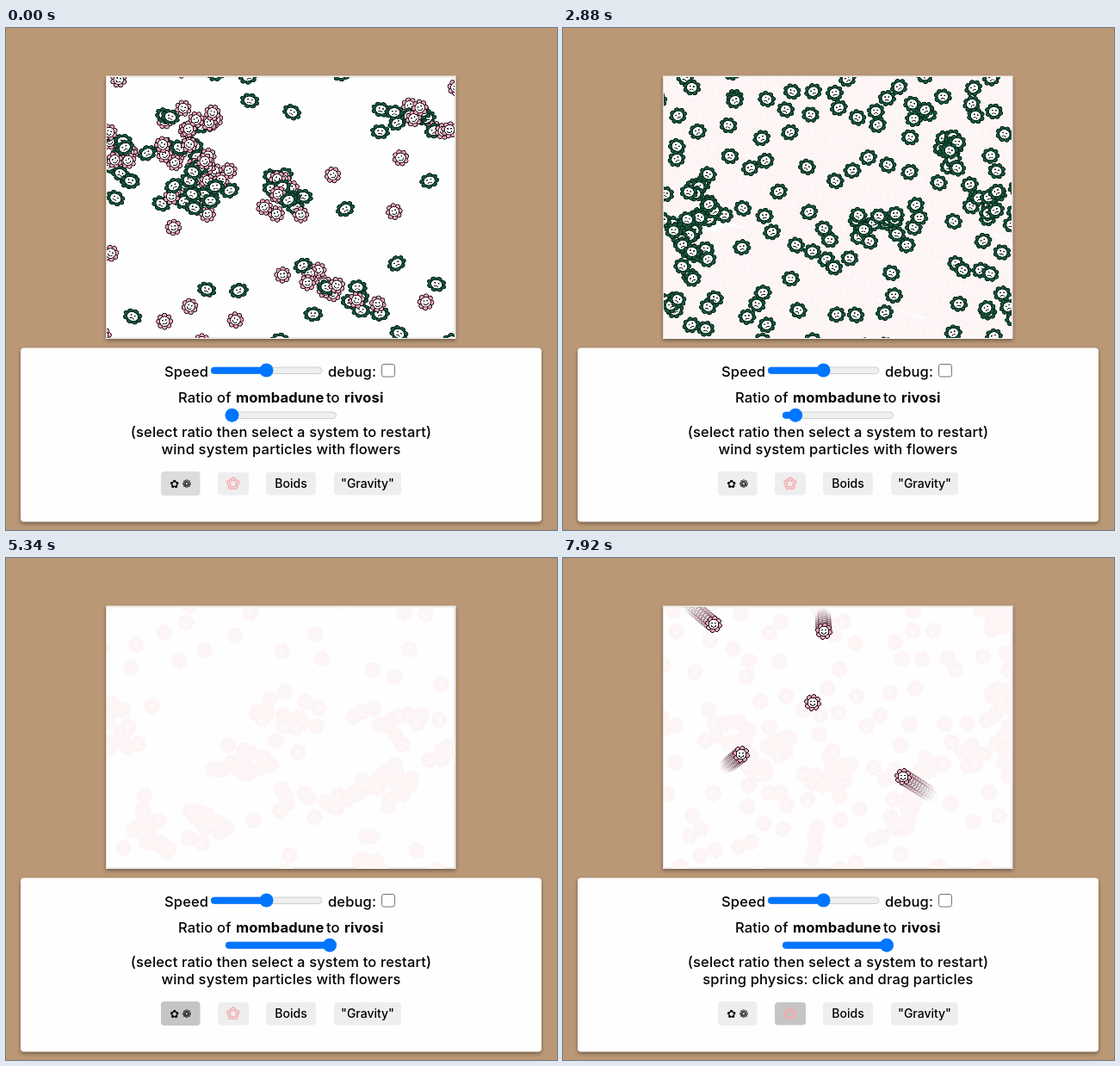
An HTML page with a canvas for the animation above (8000 ms loop, 640 px wide and 583 px high).

```html
<!DOCTYPE html>
<html lang="en">
<head>
<meta charset="utf-8">
<title>Flower particles</title>
<style>
  html, body { margin: 0; width: 100%; height: 100%; overflow: hidden; background: #ba9876; }
  svg { position: absolute; left: 0; top: 0; }
  canvas { position: absolute; left: 117px; top: 57px; width: 404px; height: 303px; }
  text { font: 500 16.5px Inter, sans-serif; letter-spacing: .15px; fill: #000; }
  .name { font-weight: 650; }
  .mid { text-anchor: middle; }
  .label { font-size: 14px; letter-spacing: 0; }
  .icon { font: 13px "DejaVu Sans", sans-serif; letter-spacing: 0; }
  .card { fill: #fefefe; filter: drop-shadow(0 2px 2px rgba(0, 0, 0, .4)); }
  .track { fill: #efefef; stroke: #c4c4c4; stroke-width: .8; }
  .blue { fill: #0075ff; }
  .button { fill: #efeeef; }
</style>
</head>
<body>
<svg width="640" height="583" viewBox="0 0 640 583">
  <rect class="card" x="116" y="55.5" width="406.5" height="305.5"/>
  <rect x="116.5" y="57" width="404.5" height="302.7" fill="none" stroke="#d9d8d4" stroke-width=".8"/>
  <rect class="card" x="17" y="371.5" width="605" height="202" rx="4"/>

  <text x="184" y="405">Speed</text>
  <rect class="track" x="238" y="394" width="129" height="7.5" rx="3.75"/>
  <rect class="blue" x="238" y="393.8" width="65" height="8" rx="4"/>
  <circle class="blue" cx="302.5" cy="397.5" r="8"/>
  <text x="374" y="405">debug:</text>
  <rect x="436.5" y="390.5" width="15" height="14.5" rx="2.5" fill="#fff" stroke="#767676"/>

  <text x="200" y="435">Ratio of</text>
  <text class="name" x="267" y="435">mombadune</text>
  <text x="372" y="435">to</text>
  <text class="name" x="393" y="435">rivosi</text>
  <rect class="track" x="255" y="446" width="128.5" height="7.5" rx="3.75"/>
  <rect class="blue" id="ratioFill" x="255" y="445.8" width="8" height="8" rx="4"/>
  <circle class="blue" id="ratioThumb" cx="262.5" cy="449.7" r="8"/>

  <text class="mid" x="319.5" y="475">(select ratio then select a system to restart)</text>
  <text class="mid" id="mode" x="319.5" y="495"></text>

  <rect class="button" id="windButton" x="180" y="515" width="45.5" height="28" rx="4"/>
  <text class="icon mid" x="195.7" y="534">✿</text>
  <text class="icon mid" x="210" y="534">❁</text>
  <rect class="button" id="springButton" x="246" y="516" width="36" height="26.5" rx="4"/>
  <path id="rosette" transform="translate(263.8 529.2)" fill="none" stroke="#f3a9ab" stroke-width="1.4"/>
  <rect class="button" x="302" y="516" width="58" height="26.5" rx="4"/>
  <text class="label mid" x="331" y="534">Boids</text>
  <rect class="button" x="381" y="516" width="78" height="26.5" rx="4"/>
  <text class="label mid" x="420" y="534">"Gravity"</text>
</svg>
<canvas></canvas>
<script>
const LOOP = 8000;
const RESTART = { wind: 1100, ratio: 3600, full: 5340, spring: 7530 };
const FIELD = { x: 107, y: 47, w: 424, h: 323 };
const $ = id => document.getElementById(id);
const mod = (v, m) => ((v % m) + m) % m;
const smooth = v => {
  v = Math.max(0, Math.min(1, v));
  return v * v * (3 - 2 * v);
};

let seed = 7;
const random = () => {
  seed = (seed * 16807) % 2147483647;
  return seed / 2147483647;
};
const bell = () => random() + random() + random() - 1.5;

const anywhere = () => ({ x: FIELD.x + random() * FIELD.w, y: FIELD.y + random() * FIELD.h });
const along = ([x1, y1, x2, y2]) => {
  const u = random();
  return { x: x1 + (x2 - x1) * u + bell() * 20, y: y1 + (y2 - y1) * u + bell() * 20 };
};
// Of a few random places, the one with the most room around it.
function roomiest(taken) {
  const room = p => Math.min(...taken.map(q => Math.hypot(p.x - q.x, p.y - q.y)));
  return Array.from({ length: 4 }, anywhere).reduce((a, b) => room(b) > room(a) ? b : a);
}

// Flowers gather along a few ridges; the loose share is strewn over the field.
function swarm(time, count, loose, kinds, ridges) {
  const flowers = [];
  for (let i = 0; i < count; i++) {
    const place = i < count * (1 - loose) ? along(ridges[i % ridges.length]) : roomiest(flowers);
    flowers.push({ ...place, spin: random(), kind: kinds[Math.floor(random() * kinds.length)] });
  }
  return { time, flowers };
}

const mixed = swarm(0, 150, .22, ['green', 'pink'], [
  [122, 130, 155, 170], [175, 125, 250, 110], [178, 145, 240, 170], [185, 185, 250, 200],
  [300, 190, 335, 195], [420, 105, 515, 105], [320, 260, 440, 345]
]);
const green = swarm(2090, 185, .48, ['green'], [
  [450, 150, 515, 180], [445, 190, 500, 215], [490, 210, 490, 270], [225, 210, 265, 170],
  [265, 170, 335, 190], [325, 75, 340, 130], [370, 180, 415, 190], [400, 315, 460, 300]
]);
const crowd = swarm(3720, 170, .2, ['green'], [
  [150, 95, 250, 103], [140, 205, 255, 170], [200, 195, 240, 145], [300, 105, 370, 175],
  [460, 85, 515, 110], [465, 160, 505, 140], [445, 205, 515, 215], [420, 220, 424, 282],
  [240, 245, 270, 310], [280, 205, 300, 150]
]);
const pink = swarm(6260, 195, .42, ['pink'], [
  [210, 155, 320, 170], [320, 185, 400, 150], [400, 165, 515, 140], [470, 160, 515, 190],
  [300, 60, 335, 135], [285, 200, 255, 248], [315, 310, 325, 355], [155, 175, 180, 200]
]);

// Wind carries every flower to the right and slightly down, with a wave.
function blow(p, dt) {
  const x = p.x + (.13 + .03 * Math.sin(p.y / 50)) * dt;
  const y = p.y + .045 * dt + 12 * (Math.sin(p.x / 50 + dt / 400) - Math.sin(p.x / 50));
  return [FIELD.x + mod(x - FIELD.x, FIELD.w), FIELD.y + mod(y - FIELD.y, FIELD.h)];
}

// x, y at the end of the loop, then speed in px per ms
const springs = [
  [175, 77, .17, .14], [303, 85, .005, .11], [290, 168, 0, 0], [207, 228, .1, -.08], [395, 254, -.19, -.12]
];

function sprite(petal, ink, face, eye, smile) {
  const s = document.createElement('canvas');
  s.width = s.height = 66;
  const c = s.getContext('2d');
  c.setTransform(3, 0, 0, 3, 33, 33);
  c.lineWidth = .9;
  const disc = (x, y, r, fill, line) => {
    c.beginPath();
    c.arc(x, y, r, 0, 7);
    c.fillStyle = fill;
    c.fill();
    c.strokeStyle = line;
    c.stroke();
  };
  for (let i = 0; i < 8; i++) {
    const a = i * Math.PI / 4 + .2;
    disc(6.8 * Math.cos(a), 6.8 * Math.sin(a), 2.7, petal, ink);
  }
  disc(0, 0, 5.7, face, ink);
  for (const x of [-1.9, 1.9]) disc(x, -1.4, .4, eye, eye);
  c.beginPath();
  if (smile) c.arc(0, .4, 2.9, .3, Math.PI - .3);
  else c.arc(0, 4.4, 2.4, Math.PI + .5, -.5);
  c.stroke();
  return s;
}
const sprites = {
  green: sprite('#17563b', '#06251a', '#fff', '#111', false),
  pink: sprite('#f0a3bf', '#1c1015', '#fff', '#111', true),
  ghost: sprite('#fdf5f5', '#fdf5f5', '#fdf5f5', '#fff', true)
};

const canvas = document.querySelector('canvas');
const ctx = canvas.getContext('2d');
const dpr = window.devicePixelRatio || 1;
canvas.width = 404 * dpr;
canvas.height = 303 * dpr;

function stamp(kind, x, y, turn = 0, sx = 1, sy = 1) {
  ctx.save();
  ctx.translate(x, y);
  ctx.rotate(turn);
  ctx.scale(sx, sy);
  ctx.drawImage(sprites[kind], -11, -11, 22, 22);
  ctx.restore();
}

function drawGhosts({ time, flowers }, t) {
  for (const p of flowers) stamp('ghost', ...blow(p, t - time), p.spin);
}

function drawSwarm({ time, flowers }, t) {
  const sway = .18 * Math.cos(2 * Math.PI * t / 597);
  for (const p of flowers) {
    const turn = .5 * Math.sin(t / 300 + p.spin * 6.3);
    const w = p.kind === 'green' ? sway : 0;
    stamp(p.kind, ...blow(p, t - time), turn, 1 + w, 1 - w * .5);
  }
}

function drawTrailed(swarm, t, from) {
  for (let past = from; past < t - 30; past += 70) drawGhosts(swarm, past);
  drawSwarm(swarm, t);
}

function drawSprings(t) {
  for (const [x, y, vx, vy] of springs) {
    for (let k = vx || vy ? 10 : 0; k >= 0; k--) {
      const dt = Math.max(RESTART.spring, t - k * 16) - 7920;
      ctx.globalAlpha = k ? .4 * (1 - k / 11) : 1;
      stamp('pink', x + vx * dt, y + vy * dt);
    }
  }
  ctx.globalAlpha = 1;
}

function drawField(t) {
  ctx.setTransform(dpr, 0, 0, dpr, -117 * dpr, -57 * dpr);
  ctx.clearRect(117, 57, 404, 303);
  if (t < RESTART.wind) drawSwarm(mixed, t);
  else if (t < 1210) return;
  else if (t < RESTART.ratio) drawTrailed(green, t, 1210);
  else if (t < RESTART.full) drawTrailed(crowd, t, RESTART.ratio);
  else if (t < RESTART.spring) {
    drawGhosts(crowd, RESTART.full);
    if (t >= 5600) drawTrailed(pink, t, 5600);
  } else {
    drawGhosts(pink, RESTART.spring);
    drawSprings(t);
  }
}

function drawPanel(t) {
  const thumb = 262.5 + 102.5 * smooth((t - 2760) / 720) + 11 * smooth((t - 4560) / 400);
  $('ratioThumb').setAttribute('cx', thumb);
  $('ratioFill').setAttribute('width', thumb - 255);
  const sprung = t >= RESTART.spring;
  const dragging = (t >= 2640 && t < RESTART.ratio) || (t >= 4440 && t < RESTART.full);
  $('windButton').style.fill = t < RESTART.wind ? '#dddbdd' : sprung || dragging ? '#efeeef' : '#c6c5c6';
  $('springButton').style.fill = sprung ? '#c6c5c6' : '#efeeef';
  $('mode').textContent = sprung ? 'spring physics: click and drag particles' : 'wind system particles with flowers';
}

// Closed outline with five lobes.
function lobes(radius, depth) {
  const points = Array.from({ length: 60 }, (_, i) => {
    const a = i * Math.PI / 30, r = radius + depth * Math.cos(5 * a);
    return `${(r * Math.sin(a)).toFixed(2)} ${(-r * Math.cos(a)).toFixed(2)}`;
  });
  return `M${points.join('L')}Z`;
}
$('rosette').setAttribute('d', lobes(6.4, .8) + lobes(3.9, .6));

// The picture advances in steps: start of a stretch, step length.
const pace = [[0, 110], [2640, 120], [5340, 260], [5600, 110], [6480, 150], [7680, 120]];
function stepped(t) {
  const [start, step] = pace.findLast(([from]) => t >= from);
  return start + Math.floor((t - start) / step + 1e-6) * step;
}

let shown = -1;
const began = performance.now();
function tick(now) {
  const t = stepped(Math.max(0, now - began) % LOOP);
  if (t !== shown) {
    drawField(t);
    drawPanel(t);
    shown = t;
  }
  requestAnimationFrame(tick);
}
tick(began);
</script>
</body>
</html>
```
